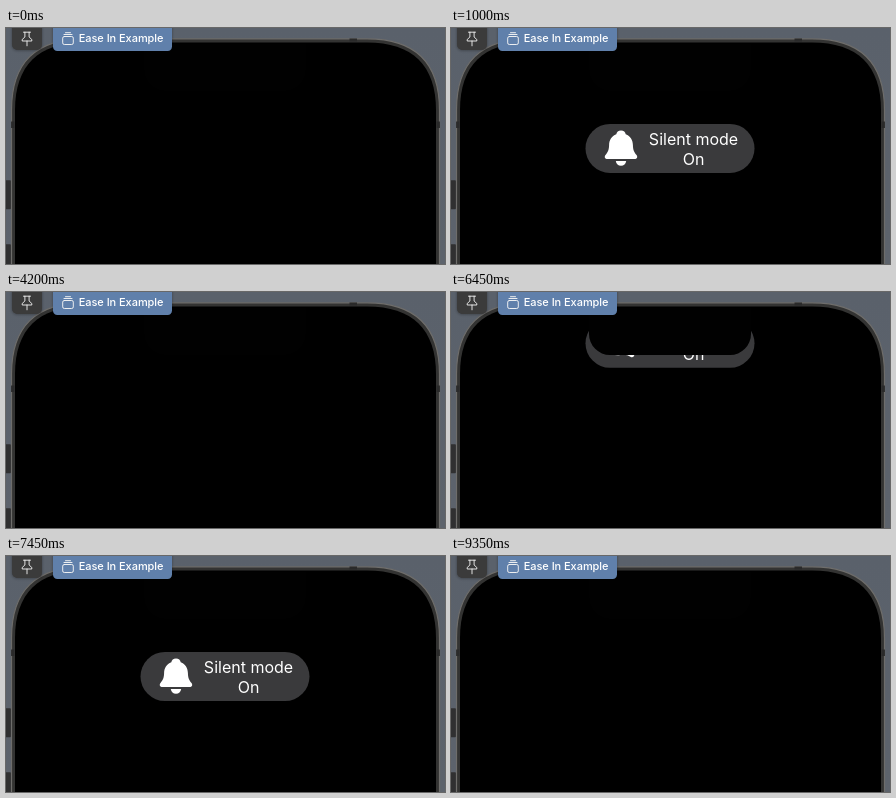
Animation of 439x236 px, one loop 9500 ms. Source, as an HTML page:

```html
<!DOCTYPE html>
<html lang="en">
<head>
<meta charset="utf-8">
<title>Silent mode</title>
<style>
  html, body { margin: 0; width: 100%; height: 100%; overflow: hidden; background: #585f69; }
  svg { display: block; width: 439px; height: 236px; font-family: Inter, sans-serif; fill: #fff; }
  .line { fill: none; stroke: #f4f4f4; stroke-linecap: round; stroke-linejoin: round; }
</style>
</head>
<body>
<svg viewBox="0 0 439 236">
  <defs>
    <linearGradient id="backdrop" x2="0" y2="1">
      <stop stop-color="#5a616b"/><stop offset="1" stop-color="#5d636c"/>
    </linearGradient>
    <filter id="shadow" x="-30%" y="-30%" width="160%" height="170%">
      <feDropShadow dx="0" dy=".5" stdDeviation="1.5" flood-opacity=".35"/>
    </filter>
  </defs>
  <rect width="439" height="236" fill="url(#backdrop)"/>

  <g fill="#303031">
    <rect x="-4" y="152.300" width="9" height="29" rx="1"/>
    <rect x="-4" y="216.200" width="9" height="30" rx="1"/>
  </g>
  <path d="M5.500 240V82C5.500 34.500 30 10.800 78 10.800H361C409 10.800 433.500 34.500 433.500 82V240" fill="#333332" stroke="#6e6d6b" stroke-width="1.2"/>
  <path d="M9 240V82C9 37.500 32.500 14.500 78 14.500H361C406.500 14.500 430 37.500 430 82V240" fill="#000"/>
  <path d="M343.500 12h7.500M6.700 93.500v6.500M432.300 93.500v6.500" fill="none" stroke="#2a2a2a" stroke-width="3.2"/>

  <g id="pill">
    <rect x="134.500" y="96" width="169" height="49" rx="24.5" fill="#3a3a3c"/>
    <g id="bell">
      <path d="M170 102.500C172.800 102.500 174.300 104 174.700 106.200C179.500 108 181.800 112 181.900 117C182 122.500 183.500 124.500 185.300 126.700C187.200 129 186 131 183.500 131H156.500C154 131 152.800 129 154.700 126.700C156.500 124.500 158 122.500 158.100 117C158.200 112 160.500 108 165.300 106.200C165.700 104 167.200 102.500 170 102.500Z"/>
      <path d="M164.800 133H175.200C174.800 136 172.800 137.800 170 137.800S165.200 136 164.800 133Z"/>
    </g>
    <g font-size="16" text-anchor="middle">
      <text x="242.500" y="116.700">Silent mode</text>
      <text x="242.500" y="136.900">On</text>
    </g>
  </g>
  <path d="M138 16H300V42A21 21 0 0 1 279 63H159A21 21 0 0 1 138 42Z" fill="#010101"/>

  <g filter="url(#shadow)">
    <rect x="6" y="-8" width="30" height="30" rx="5" fill="#3a3a3b"/>
    <rect x="47" y="-8" width="119" height="31" rx="4.5" fill="#6080ab"/>
  </g>
  <path class="line" d="M17.500 4.200H24.500M18.900 4.200V9L16.200 11.500V13H25.800V11.500L23.100 9V4.200M21 13V17.800" stroke-width=".9"/>
  <g id="stack" class="line" stroke-width=".95">
    <rect x="56.700" y="8.500" width="10.600" height="8" rx="1.6"/>
    <path d="M58 6.500H66M59.500 4.700H64.500"/>
  </g>
  <g id="spinner" class="line" stroke-width="1.4"></g>
  <text x="72.700" y="14.100" font-size="11" font-weight="500" letter-spacing="-.05">Ease In Example</text>
</svg>
<script>
const LOOP = 9500, STEP = 50;
const SHOWS = [
  { enter: 50, leave: 2850 },
  { enter: 6400, leave: 9173 },
];
const [pill, bell, stack, spinner] =
  ["pill", "bell", "stack", "spinner"].map(id => document.getElementById(id));

for (let i = 0; i < 8; i++) {
  spinner.innerHTML += `<path d="M62 7.500V5" transform="rotate(${i * 45} 62 10.500)"/>`;
}

// Remaining distance of a damped spring, from 1 to 0.
function spring(ms, damping, omega = 11.4) {
  const t = ms / 1000, decay = damping * omega;
  const wd = omega * Math.sqrt(1 - damping ** 2);
  return Math.exp(-decay * t) * (Math.cos(wd * t) + decay / wd * Math.sin(wd * t));
}

function render(t) {
  const show = SHOWS.find(s => t > s.enter && t < s.leave + 150);
  pill.style.display = show ? "" : "none";
  if (show) {
    const age = t - show.enter;
    const rise = 17.5 * (Math.max(0, t - show.leave) / 50) ** 1.6;
    pill.setAttribute("transform", `translate(0 ${-79 * spring(age, 0.69) - rise})`);
    bell.setAttribute("transform", `rotate(${-115 * spring(age, 0.6)} 170 120)`);
  }

  const busy = t >= 3800 && t < 4200;
  stack.style.display = busy ? "none" : "";
  spinner.style.display = busy ? "" : "none";
  const turn = Math.floor((t - 3800) / 100);
  [...spinner.children].forEach((spoke, i) => {
    spoke.style.opacity = 0.25 + 0.75 * ((i - turn + 80) % 8) / 7;
  });
}

function tick() {
  render(Math.floor(performance.now() % LOOP / STEP) * STEP);
  requestAnimationFrame(tick);
}
tick();
</script>
</body>
</html>
```
